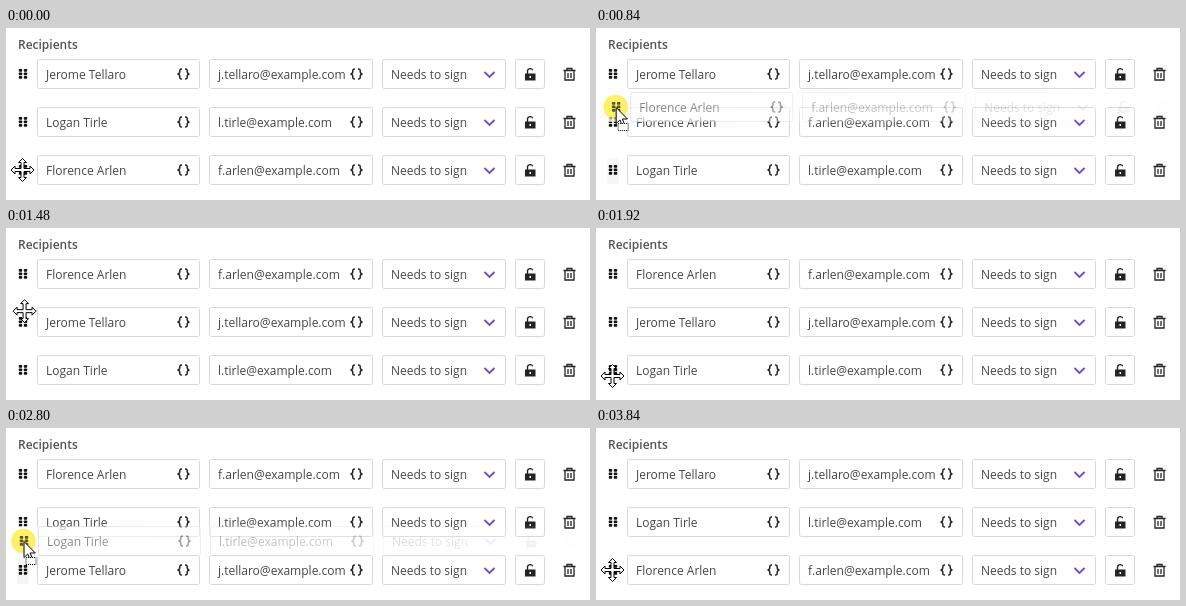
These frames come from a looping animation (584 px wide and 172 px high, 3.88 s). An HTML page:

```html
<!DOCTYPE html>
<html lang="en">
<head>
<meta charset="utf-8">
<title>Reorder recipients</title>
<style>
  html, body { margin: 0; width: 100%; height: 100%; overflow: hidden; background: #fff; }
  svg { display: block; width: 584px; height: 172px; }
  text { font: 12px "Open Sans", "Noto Sans", sans-serif; fill: #484644; }
  .title { font-weight: 600; fill: #555351; }
  .box { fill: #fff; stroke: #dad8d6; }
  .icon { fill: none; stroke: #252423; stroke-width: 1.4; }
  .cursor { fill: #fff; stroke: #000; }
  #halo { fill: #fff06a; mix-blend-mode: multiply; }
</style>
</head>
<body>
<svg viewBox="0 0 584 172">
  <defs>
    <path id="brace" class="icon" d="M-1.5-5C-4-5-3.700-3.800-3.700-2.400S-4.300-.2-6 0C-4.300.2-3.700 1-3.700 2.400S-4 5-1.500 5" style="stroke-width:1.5"/>
    <g id="braces"><use href="#brace"/><use href="#brace" transform="scale(-1 1)"/></g>
    <g id="controls">
      <rect class="box" x="376.5" y="-14.5" width="123" height="29" rx="2"/>
      <text x="385" y="5">Needs to sign</text>
      <path d="M478.5-2l5 5 5-5" fill="none" stroke="#6f4bc4" stroke-width="1.8"/>
      <rect class="box" x="509.5" y="-14.5" width="29" height="29" rx="2"/>
      <path class="icon" d="M521.5 0v-2.7a2.7 2.7 0 0 1 5.2-1"/>
      <path d="M519-.5h10.500v7h-10.500zM523.500 2v2h1.500v-2z" fill="#252423" fill-rule="evenodd"/>
      <path class="icon" d="M557.5-3.500h12M561-3.500v-2h5v2M559-3.500v9.500h9v-9.500M562-1v5M565-1v5" style="stroke-width:1.3"/>
    </g>
    <radialGradient id="fade" gradientUnits="userSpaceOnUse" cx="17" cy="0" r="560">
      <stop offset="0" stop-color="#fff" stop-opacity=".7"/>
      <stop offset=".15" stop-color="#fff" stop-opacity=".58"/>
      <stop offset=".4" stop-color="#fff" stop-opacity=".35"/>
      <stop offset=".75" stop-color="#fff" stop-opacity=".15"/>
      <stop offset="1" stop-color="#fff" stop-opacity="0"/>
    </radialGradient>
    <mask id="soft" maskUnits="userSpaceOnUse" x="0" y="-16" width="584" height="32">
      <rect y="-16" width="584" height="32" fill="url(#fade)"/>
    </mask>
    <g id="people"></g>
  </defs>
  <text class="title" x="12" y="21">Recipients</text>
  <rect id="hover" x="11" y="130" width="12" height="26" rx="2" fill="#f7f6f5"/>
  <use class="row" y="46"/>
  <use class="row" y="94"/>
  <use class="row" y="142"/>
  <g id="ghost" mask="url(#soft)">
    <rect y="-15" width="584" height="30" fill="#fff"/>
    <use id="dragged"/>
  </g>
  <circle id="halo" r="12.3"/>
  <g id="mouse">
    <path id="move" class="cursor" d="M0-11.500L4-7.500H1.500V-1.500H7.500V-4L11.500 0L7.500 4V1.500H1.500V7.500H4L0 11.500L-4 7.500H-1.500V1.500H-7.500V4L-11.500 0L-7.500-4V-1.500H-1.500V-7.500H-4Z"/>
    <path id="arrow" class="cursor" d="M.5.500V16.500L4.200 13L6.700 18.500L9 17.500L6.600 12H11.800Z"/>
    <rect id="parcel" class="cursor" x="2.500" y="16.500" width="10" height="7" stroke-dasharray="1 1"/>
  </g>
</svg>
<script>
const $ = id => document.getElementById(id);
const show = (id, on) => $(id).style.display = on ? '' : 'none';
const place = (id, x, y) => $(id).setAttribute('transform', `translate(${x} ${y})`);

const people = [
  ['Jerome Tellaro', 'j.tellaro@example.com'],
  ['Logan Tirle', 'l.tirle@example.com'],
  ['Florence Arlen', 'f.arlen@example.com']
];

const field = (x, w, text) => `
  <rect class="box" x="${x + .5}" y="-14.5" width="${w}" height="29" rx="2"/>
  <text x="${x + 9}" y="5">${text}</text>
  <use href="#braces" x="${x + w - 15.5}"/>`;

const dots = [-5, -1.5, 2].map(y => [12.8, 17.8].map(x =>
  `<rect x="${x}" y="${y}" width="3.4" height="2.8" rx=".7" fill="#111"/>`).join('')).join('');

$('people').innerHTML = people.map(([name, mail], i) =>
  `<g id="p${i}">${dots}${field(31, 162, name)}${field(203, 163, mail)}<use href="#controls"/></g>`).join('');

// Pointer path: time, x, y
const path = [
  [0, 16.5, 142], [480, 16.5, 142], [520, 16.5, 139], [600, 18, 117], [680, 18, 104],
  [800, 19, 84], [920, 21, 69], [1040, 23, 57], [1120, 24, 51], [1200, 24, 51],
  [1320, 22, 58], [1600, 16, 102], [1760, 13, 132], [1920, 16.5, 148], [2000, 17, 149],
  [2200, 17, 149], [2320, 17, 142], [2520, 17, 142], [2760, 17.5, 119], [2800, 17.5, 113],
  [2960, 17.5, 100], [3080, 17, 93], [3240, 17, 93], [3760, 17, 136], [3880, 17, 136]
];

const drags = [
  { who: 2, press: 360, start: 520, drop: 1200 },
  { who: 1, press: 2360, start: 2560, drop: 3240 }
];

function pointer(t) {
  const i = path.findIndex(p => p[0] > t);
  const [t0, x0, y0] = path[i - 1], [t1, x1, y1] = path[i];
  const k = (t - t0) / (t1 - t0);
  return [x0 + (x1 - x0) * k, y0 + (y1 - y0) * k];
}

function orderAt(t, y) {
  if (t < 520) return [0, 1, 2];
  if (t < 1200) return y > 115 ? [0, 1, 2] : y > 67 ? [0, 2, 1] : [2, 0, 1];
  return t < 2800 ? [2, 0, 1] : [2, 1, 0];
}

const rows = document.querySelectorAll('.row');

function draw(now) {
  let t = Math.floor(now % 3880 / 40) * 40;
  if (t >= 3840) t = 0;
  const [x, y] = pointer(t);
  orderAt(t, y).forEach((p, i) => rows[i].setAttribute('href', '#p' + p));

  const held = drags.find(d => t >= d.press && t < d.drop);
  const dragging = !!held && t >= held.start;
  const onGrip = [46, 94, 142].some(c => Math.abs(y - c) <= 13) && x < 23;
  const move = !dragging && onGrip;

  show('halo', held);
  show('ghost', dragging);
  show('hover', dragging);
  show('parcel', dragging);
  show('move', move);
  show('arrow', !move);
  place('halo', x, y);
  place('mouse', x, y);
  if (dragging) {
    $('dragged').setAttribute('href', '#p' + held.who);
    place('ghost', x - 16.5, y);
  }
}

const begin = performance.now();
function tick() {
  draw(performance.now() - begin);
  requestAnimationFrame(tick);
}
tick();
</script>
</body>
</html>
```
